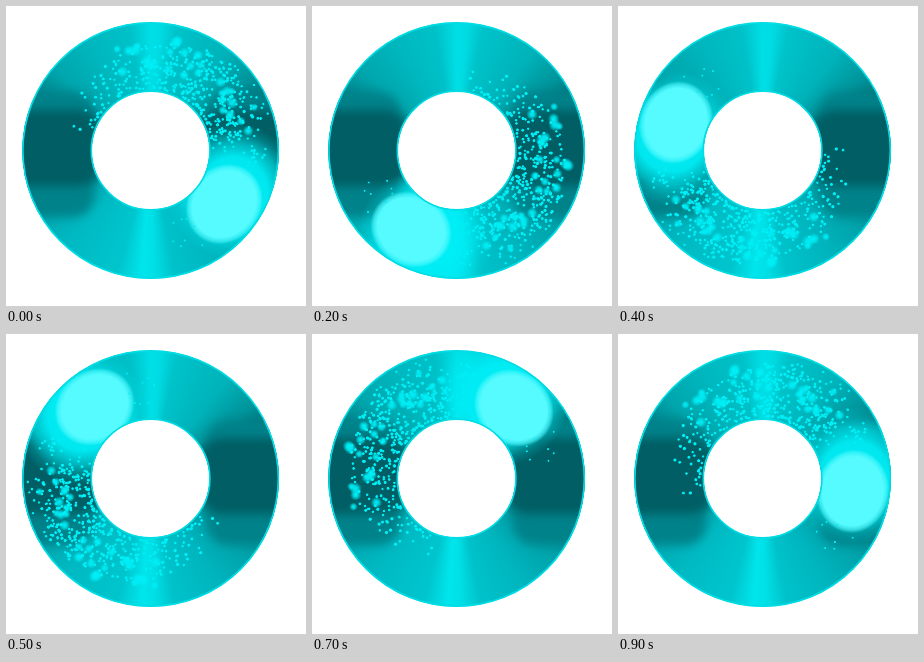
Write an HTML page with a canvas that moves like this. It is 300 by 300 pixels and loops after 1000 ms.

```html
<!DOCTYPE html>
<html lang="en">
<head>
<meta charset="utf-8">
<title>Spinning ring</title>
<style>
html, body { margin: 0; width: 100%; height: 100%; overflow: hidden; background: #fff; }
canvas { display: block; width: 300px; height: 300px; }
</style>
</head>
<body>
<canvas id="stage"></canvas>
<script>
const canvas = document.getElementById('stage');
const ctx = canvas.getContext('2d');
const scale = window.devicePixelRatio || 1;
canvas.width = canvas.height = 300 * scale;

const C = 144.6, OUTER = 128.2, INNER = 59;
const TAU = Math.PI * 2, STEP = 100;
const CORE = '86,251,255', CYAN = '0,238,246';
const rad = deg => deg * Math.PI / 180;

// Head position for each 100 ms step, degrees clockwise from the right
const headAngles = [36, 78, 120, 164, 198, 232, 271, 309, 338, 368];

// Metal reflections: degrees clockwise from the top
const metal = [
  [0, '#00dfe6'], [5, '#00dbe2'], [12, '#00c3ca'], [38, '#00b2b9'],
  [55, '#00939a'], [66, '#006c72'], [82, '#005c62'], [102, '#00656b'],
  [113, '#008c94'], [130, '#00a4ac'], [148, '#00b5be'], [169, '#00c2ca'],
  [178, '#00dfe6'], [184, '#00e5ec'], [195, '#00c5cd'], [222, '#00b9c2'],
  [238, '#00a8b0'], [249, '#00868d'], [257, '#006067'], [284, '#006369'],
  [296, '#00828a'], [310, '#00a6ad'], [332, '#00b8bf'], [350, '#00c1c8'],
  [360, '#00dfe6']
];

let seed = 20483;
function rnd() {
  seed = (seed * 1664525 + 1013904223) % 4294967296;
  return seed / 4294967296;
}

// A particle sits a fixed angle behind the head
const dots = [];
function add(behind, r, size, soft) {
  dots.push({ behind, r, size, soft });
}
for (let i = 0; i < 30; i++) {
  add(42 + rnd() * 106, 82 + rnd() * 32, 4 + rnd() * 2.4, true);
}
for (let i = 0; i < 400; i++) {
  const behind = 26 + 184 * Math.pow((rnd() + rnd()) / 2, 1.4);
  const limit = Math.min(124, 126 - (behind - 60) * 0.31);
  add(behind, 62 + (limit - 62) * Math.pow(rnd(), 1.2), 1.2 + rnd() * 0.6, false);
}
for (let i = 0; i < 8; i++) {
  add(-22 - rnd() * 20, 70 + rnd() * 45, 1.1, false);
}

function disc(x, y, r) {
  ctx.beginPath();
  ctx.arc(x, y, r, 0, TAU);
}

function softDisc(x, y, r, rgb, stops) {
  const g = ctx.createRadialGradient(x, y, 0, x, y, r);
  stops.forEach(([at, alpha]) => g.addColorStop(at, `rgba(${rgb},${alpha})`));
  ctx.fillStyle = g;
  disc(x, y, r);
  ctx.fill();
}

// A blurred band mirrored on both sides of the ring
function sideBand(inset, top, bottom, color) {
  ctx.fillStyle = color;
  for (const x of [C - inset - 100, C + inset]) {
    ctx.beginPath();
    ctx.roundRect(x, top, 100, bottom - top, 22);
    ctx.fill();
  }
}

function drawMetal() {
  const g = ctx.createConicGradient(-Math.PI / 2, C, C);
  metal.forEach(([deg, color]) => g.addColorStop(deg / 360, color));
  ctx.fillStyle = g;
  ctx.fillRect(0, 0, 300, 300);
  ctx.filter = `blur(${5 * scale}px)`;
  sideBand(56, 86, 211, '#00828a');
  sideBand(50, 104, 180, '#005e64');
  ctx.filter = 'none';
}

function drawGlow(head) {
  ctx.save();
  ctx.translate(C, C);
  ctx.rotate(rad(head));
  ctx.save();
  ctx.rotate(rad(-10));
  softDisc(92, 0, 68, CYAN, [[0, 1], [0.5, 0.95], [0.7, 0.6], [0.86, 0.2], [1, 0]]);
  ctx.restore();
  ctx.translate(91, 0);
  ctx.scale(0.88, 1);
  softDisc(0, 0, 42, CORE, [[0, 1], [0.82, 1], [0.92, 0.6], [1, 0]]);
  ctx.restore();
}

function drawDots(head) {
  for (const d of dots) {
    const a = rad(head - d.behind);
    const x = C + Math.cos(a) * d.r, y = C + Math.sin(a) * d.r;
    const fade = d.soft ? [[0, 1], [0.4, 0.8], [1, 0]] : [[0, 1], [0.75, 1], [1, 0.5]];
    softDisc(x, y, d.size, CYAN, fade);
  }
}

function draw(step) {
  const head = headAngles[step];
  ctx.setTransform(scale, 0, 0, scale, 0, 0);
  ctx.clearRect(0, 0, 300, 300);
  ctx.save();
  ctx.beginPath();
  ctx.arc(C, C, OUTER, 0, TAU);
  ctx.moveTo(C + INNER, C);
  ctx.arc(C, C, INNER, 0, TAU, true);
  ctx.clip();
  drawMetal();
  drawGlow(head);
  drawDots(head);
  ctx.restore();
  ctx.strokeStyle = '#00dde5';
  ctx.lineWidth = 1.6;
  for (const r of [OUTER - 0.5, INNER + 0.3]) {
    disc(C, C, r);
    ctx.stroke();
  }
}

let start = null, shown = -1;
function tick(now) {
  if (start === null) start = now;
  const step = Math.floor((now - start) / STEP) % headAngles.length;
  if (step !== shown) draw(shown = step);
  requestAnimationFrame(tick);
}
draw(0);
requestAnimationFrame(tick);
</script>
</body>
</html>
```
